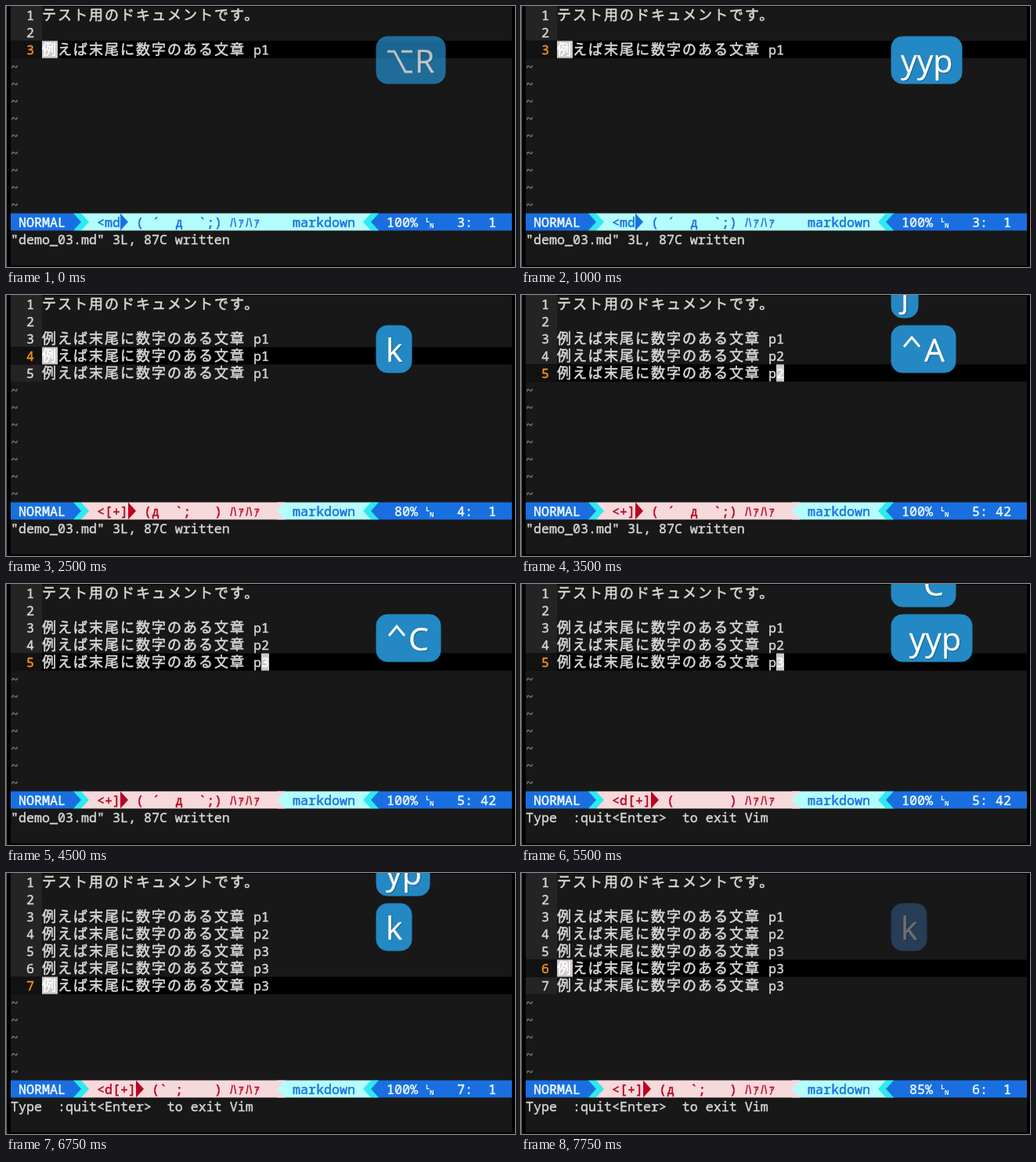
Write an HTML page that moves like this. It is 650x333 px and loops after 8000 ms.

```html
<!DOCTYPE html>
<html lang="ja">
<head>
<meta charset="utf-8">
<title>Vim key demo</title>
<style>
  html, body { margin: 0; width: 100%; height: 100%; overflow: hidden; background: #000; }
  svg { display: block; width: 650px; height: 333px; }
  text { white-space: pre; stroke-linejoin: round; }
  .mono { font: 500 16.667px "Noto Sans Mono", monospace; stroke-width: .45px; }
  .wide { font: 500 18px "Noto Sans CJK JP", "Noto Sans CJK", sans-serif; letter-spacing: 2px; stroke-width: .6px; }
  .kana { font: 500 17px "Noto Sans CJK JP", "Noto Sans CJK", sans-serif; letter-spacing: 1.5px; stroke-width: .3px; }
  .tiny { font: 700 9px "Noto Sans Mono", monospace; stroke-width: 0; }
  .key { font: 41px "Open Sans", sans-serif; stroke-width: .3px; }
</style>
</head>
<body>
<svg id="stage" viewBox="0 0 650 333"></svg>
<script>
const STEP = 250, LOOP = 8000;
const BLUE = '#1a6fe0', CYAN = '#2fe9f2', AQUA = '#b5fdfc', PINK = '#f6d9db', RED = '#b9051f', FG = '#d6d6d3';
const WRITTEN = '"demo_03.md" 3L, 87C written';
const QUIT = 'Type  :quit<Enter>  to exit Vim';

// Status line moods: file label and face
const moods = {
  saved: ['<md', '( ´  д  `;)'],
  pant: ['<+]', '( ´  д  `;)'],
  turn: ['<[+]', '(д  `;   )'],
  side: ['<d[+]', '(` ;    )'],
  away: ['<d[+]', '(       )']
};
const keyWidth = { '⌥R': 88, '^A': 82, '^C': 82, y: 45, yy: 64, yyp: 90, ' y': 56, ' yyp': 103, yp: 68, k: 45, j: 34 };

// Each entry: step, then what changes; key and prev are [label, opacity]
const script = [
  [0, { nums: '1', cur: 3, col: 1, mood: 'saved', msg: WRITTEN, key: ['⌥R', .75], prev: null }],
  [1, { key: null }],
  [3, { key: ['y', 1] }],
  [4, { key: ['yyp', 1] }],
  [5, { nums: '11', cur: 4, mood: 'side' }],
  [6, { key: ['yy', 1], prev: ['yyp', .8] }],
  [7, { nums: '111', cur: 5, key: ['yyp', 1], prev: ['yyp', .4] }],
  [8, { prev: null }],
  [9, { key: ['yyp', .75] }],
  [10, { cur: 4, mood: 'turn', key: ['k', 1] }],
  [11, { nums: '121', col: 42, mood: 'pant', key: ['^A', 1], prev: ['k', 1] }],
  [12, { prev: ['k', .5] }],
  [13, { cur: 5, key: ['j', 1], prev: ['^A', 1] }],
  [14, { nums: '122', key: ['^A', 1], prev: ['j', 1] }],
  [15, { nums: '123', prev: null }],
  [16, { key: null }],
  [18, { key: ['^C', 1] }],
  [19, { mood: 'away', msg: QUIT }],
  [21, { key: [' y', 1], prev: ['^C', 1] }],
  [22, { key: [' yyp', 1] }],
  [23, { nums: '1233', cur: 6, col: 1, mood: 'side', prev: ['^C', .5] }],
  [24, { prev: null }],
  [25, { key: ['y', 1], prev: [' yyp', .8] }],
  [26, { nums: '12333', cur: 7, key: ['yp', 1], prev: [' yyp', .4] }],
  [27, { key: ['k', 1], prev: ['yp', 1] }],
  [28, { cur: 6, mood: 'turn', prev: ['yp', .5] }],
  [29, { prev: null }],
  [30, { key: ['k', .75] }],
  [31, { key: ['k', .38] }]
];

const X = col => 6 + 10 * col;
const Y = row => .5 + 22 * (row - 1);
const escape = s => s.replace(/&/g, '&amp;').replace(/</g, '&lt;');
const rect = (x, y, w, h, fill) => `<rect x="${x}" y="${y}" width="${w}" height="${h}" fill="${fill}"/>`;
const label = (x, y, s, fill, cls) => `<text class="${cls}" x="${x}" y="${y}" fill="${fill}" stroke="${fill}">${escape(s)}</text>`;
const base = row => Y(row) + 17.5;
const mono = (col, row, s, fill = FG) => label(X(col), base(row), s, fill, 'mono');
const wide = (col, row, s, fill = FG) => label(X(col), base(row), s, fill, 'wide');
const bar = (from, to, fill) => rect(X(from), Y(13), 10 * (to - from), 22, fill);
const arrow = (col, fill, left) => {
  const back = X(col + (left ? 1 : 0)), tip = X(col + (left ? 0 : 1)), top = Y(13);
  return `<path d="M${back} ${top}L${tip} ${top + 11}L${back} ${top + 22}z" fill="${fill}"/>`;
};

function buffer({ nums, cur, col }) {
  const last = nums.length + 2;
  let out = rect(6, 0, 40, Y(last + 1), '#242424') +
    rect(6, Y(cur), 640, 22, '#000') + rect(6, Y(cur), 40, 22, '#121212');
  for (let row = 1; row <= 12; row++) {
    if (row > last) { out += mono(0, row, '~', '#747474'); continue; }
    out += mono(2, row, String(row), row === cur ? '#f3901d' : FG);
    if (row === 1) out += wide(4, row, 'テスト用のドキュメントです。');
    if (row > 2) out += wide(4, row, '例えば末尾に数字のある文章') + mono(31, row, 'p' + nums[row - 3]);
  }
  const block = (c, w) => rect(X(c), Y(cur), w, 22, '#cfcacd');
  return out + (col === 1 ? block(4, 20) + wide(4, cur, '例', '#fff')
                          : block(32, 10) + mono(32, cur, nums[cur - 3], '#fff'));
}

function status({ nums, cur, col, mood }) {
  const [file, face] = moods[mood], saved = mood === 'saved';
  const bg = saved ? AQUA : PINK, ink = saved ? BLUE : RED, tip = 11 + file.length;
  const percent = Math.floor(100 * cur / (nums.length + 2)) + '%';
  return bar(0, 8, BLUE) + bar(8, 9, CYAN) + arrow(8, BLUE) + bar(9, 35, bg) + arrow(9, CYAN) +
    mono(1, 13, 'NORMAL', '#eefaff') +
    mono(11, 13, file, ink) + arrow(tip, ink) + mono(tip + 2, 13, face, ink) +
    label(X(28), base(13), 'ﾊｧﾊｧ', ink, 'kana') +
    bar(35, 46, AQUA) + (saved ? '' : bar(34, 35, PINK) + arrow(34, AQUA, true)) +
    mono(36, 13, 'markdown', BLUE) + arrow(45, CYAN, true) +
    bar(46, 64, BLUE) + bar(46, 47, CYAN) + arrow(46, BLUE, true) +
    mono(48, 13, percent.padStart(4), '#e8f6ff') +
    label(536, 276, 'L', '#e8f6ff', 'tiny') + label(541, 283, 'N', '#e8f6ff', 'tiny') +
    mono(57, 13, cur + ':' + String(col).padStart(3), '#e8f6ff');
}

function badge(entry, y) {
  if (!entry) return '';
  const [name, opacity] = entry;
  const fill = opacity < .5 ? '#4479bb' : '#2388c3';
  const stroke = d => `<path d="${d}" fill="none" stroke="#fff" stroke-width="3"/>`;
  let mark = '', x = 12, s = name;
  if (name[0] === '^') { mark = stroke('M16 27L26 15L36 27'); x = name[1] === 'A' ? 42 : 41; s = name[1]; }
  if (name[0] === '⌥') { mark = stroke('M14 19h9l14 26h9M32 19h14'); x = 49; s = name[1]; }
  return `<g transform="translate(473 ${y})" opacity="${opacity}">` +
    `<rect width="${keyWidth[name]}" height="60" rx="14" fill="${fill}" stroke="${fill}"/>${mark}` +
    label(x + 1, 47, s, '#0b385766', 'key') + label(x, 45.5, s, '#fff', 'key') + '</g>';
}

const stage = document.getElementById('stage');
let shown = -1;

function draw(now) {
  const step = Math.floor(now % LOOP / STEP);
  if (step !== shown) {
    shown = step;
    const state = Object.assign({}, ...script.filter(e => e[0] <= step).map(e => e[1]));
    stage.innerHTML = rect(0, 0, 1, 333, '#6a6a6a') + rect(6, 1, 640, 330, '#181818') +
      buffer(state) + status(state) + mono(0, 14, state.msg) +
      badge(state.prev, -31) + badge(state.key, 39);
  }
  requestAnimationFrame(() => draw(performance.now() - start));
}

const start = performance.now();
draw(0);
</script>
</body>
</html>
```
